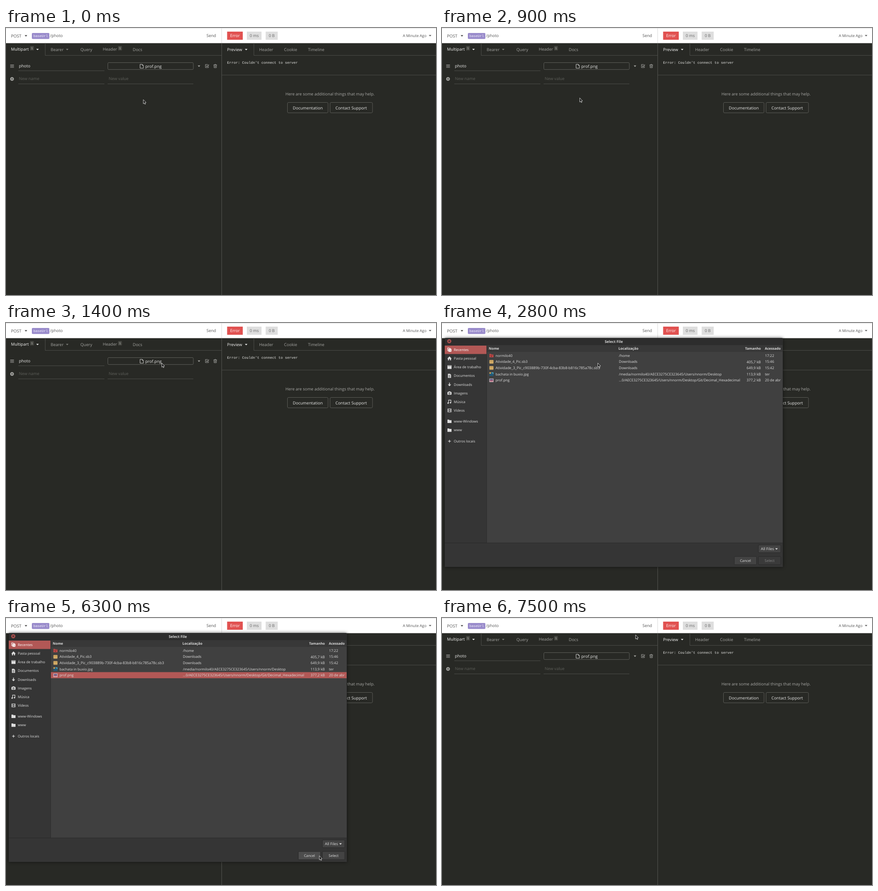
Animation, 948 px wide and 590 px high, one loop 8 s. Source, as an HTML page with a canvas:

```html
<!DOCTYPE html>
<html lang="pt">
<head>
<meta charset="utf-8">
<title>Select File</title>
<style>
html, body { margin: 0; width: 100%; height: 100%; overflow: hidden; background: #282925; }
canvas { display: block; width: 948px; height: 590px; }
</style>
</head>
<body>
<canvas id="stage"></canvas>
<script>
const W = 948, H = 590, LOOP = 8000;
const canvas = document.getElementById('stage');
const dpr = window.devicePixelRatio || 1;
canvas.width = W * dpr;
canvas.height = H * dpr;
const c = canvas.getContext('2d');
c.scale(dpr, dpr);
c.textRendering = 'geometricPrecision';

const SANS = '"Open Sans", "Noto Sans", sans-serif';
const MONO = '"Liberation Mono", monospace';
const BG = '#282925', LINE = '#4b4c48', RED = '#b25856';
const USER = 'normilo40', SHORT_USER = 'nnorm';

// y is the middle of the capitals
function text(s, x, y, color, size = 9.1, opt = {}) {
  c.font = `${opt.weight || 400} ${size}px ${opt.font || SANS}`;
  c.textAlign = opt.align || 'left';
  c.fillStyle = color;
  c.fillText(s, x, y + size * 0.36);
}

function rect(x, y, w, h, color) {
  c.fillStyle = color;
  c.fillRect(x, y, w, h);
}

function box(x, y, w, h, r, fill, stroke) {
  c.beginPath();
  c.roundRect(x, y, w, h, r);
  if (fill) { c.fillStyle = fill; c.fill(); }
  if (stroke) { c.strokeStyle = stroke; c.lineWidth = 1; c.stroke(); }
}

function path(points, x, y, close) {
  c.beginPath();
  points.forEach(([px, py]) => c.lineTo(x + px, y + py));
  if (close) c.closePath();
}

function shape(points, x, y, color) {
  path(points, x, y, true);
  c.fillStyle = color;
  c.fill();
}

function stroke(points, x, y, color, width = 1, close = false) {
  path(points, x, y, close);
  c.strokeStyle = color;
  c.lineWidth = width;
  c.stroke();
}

function disc(x, y, r, color) {
  c.beginPath();
  c.arc(x, y, r, 0, Math.PI * 2);
  c.fillStyle = color;
  c.fill();
}

const caret = (x, y, color, r = 2.8) =>
  shape([[-r, -r / 2], [r, -r / 2], [0, r / 2 + 0.3]], x, y, color);

function badge(x, y) {
  box(x, y, 8.6, 9.4, 1.5, '#454641');
  text('1', x + 4.3, y + 4.7, '#b5b5b2', 7, { align: 'center', font: MONO });
}

function topBar() {
  rect(0, 0, W, 33.5, '#fff');
  rect(0, 0, W, 1, '#dedede');
  text('POST', 11, 17.5, '#555', 9.2);
  caret(44, 17.2, '#444');
  box(57, 11, 38.6, 13.3, 2, '#998bcb');
  text('baseUrl', 60.5, 17.2, '#f4f2fc', 7.55, { font: MONO });
  text('/photo', 97, 17, '#555', 8.95);
  text('Send', 442, 17.2, '#555', 9);
  rect(475, 0, 1, 33.5, '#dcdcdc');
  rect(487.5, 8, 34.5, 18, '#e15251');
  text('Error', 504.8, 17.2, '#fff', 9, { align: 'center' });
  rect(531, 8, 32.3, 18, '#dedede');
  text('0 ms', 547.2, 17.2, '#666', 8.9, { align: 'center' });
  rect(572.5, 8, 26.5, 18, '#dedede');
  text('0 B', 585.7, 17.2, '#666', 8.9, { align: 'center' });
  text('A Minute Ago', 874.8, 16.8, '#555', 8.4);
  caret(935, 16.8, '#555');
}

function tabs() {
  const dim = '#a4a4a1';
  text('Multipart', 11, 47.2, '#f5f5f4');
  badge(53, 40);
  caret(69.5, 47.3, '#f0f0ef');
  text('Bearer', 98.5, 47.5, dim);
  caret(135, 47.5, '#777873');
  text('Query', 164, 47.5, dim);
  text('Header', 213.5, 47.2, dim);
  badge(247, 40);
  text('Docs', 279.5, 47.5, dim);
  rect(86, 33.5, 1, 27, LINE);
  rect(86, 60, 389, 1, LINE);

  text('Preview', 487.5, 47.5, '#f5f5f4', 9.2);
  caret(529.5, 47.6, '#f0f0ef');
  text('Header', 558, 47.5, dim);
  text('Cookie', 613, 47.5, dim);
  text('Timeline', 665.8, 47.5, dim);
  rect(546, 33.5, 1, 27, LINE);
  rect(546, 60, W - 546, 1, LINE);
}

function trash(x, y, color) {
  stroke([[-3.8, -2.5], [3.8, -2.5]], x, y, color, 0.9);
  stroke([[-1.3, -2.6], [-1, -3.8], [1, -3.8], [1.3, -2.6]], x, y, color, 0.8);
  stroke([[-2.8, -2.5], [-2.5, 3.8], [2.5, 3.8], [2.8, -2.5]], x, y, color, 0.9);
  for (const dx of [-1.1, 0, 1.1]) stroke([[dx, -1], [dx, 2.4]], x, y, color, 0.6);
}

function gear(x, y, color) {
  for (let i = 0; i < 8; i++) {
    const a = i * Math.PI / 4, dx = Math.cos(a), dy = Math.sin(a);
    stroke([[dx * 2, dy * 2], [dx * 4.3, dy * 4.3]], x, y, color, 1.8);
  }
  disc(x, y, 3.3, color);
  disc(x, y, 1.4, BG);
}

function form() {
  const icon = '#aaaaa7', hint = '#5d5e59';
  for (const dy of [81, 83.7, 86.4]) rect(9.3, dy, 8.2, 1.1, icon);
  text('photo', 28.5, 83.5, '#e9e9e8', 9.05);
  rect(27, 94, 190, 1, LINE);
  box(224.5, 76.5, 188.5, 15.2, 2, null, '#5e5f5a');
  stroke([[0, 0], [4.8, 0], [7.4, 2.6], [7.4, 8.6], [0, 8.6]], 295.6, 80.2, '#dededc', 0.9, true);
  stroke([[4.8, 0], [4.8, 2.7], [7.4, 2.7]], 295.6, 80.2, '#dededc', 0.8);
  text('prof.png', 307, 84.8, '#e9e9e8');
  caret(425.5, 84.2, icon);
  stroke([[3.1, 0.2], [3.1, 3.6], [-3.5, 3.6], [-3.5, -3.4], [2, -3.4]], 443.2, 84, icon, 0.9);
  stroke([[-1.9, -0.6], [0, 1.4], [4.2, -2.9]], 443.2, 84, icon, 1.3);
  trash(461.3, 84, icon);
  gear(13.3, 112.6, icon);
  text('New name', 28.5, 112.2, hint, 9);
  text('New value', 226.5, 112.2, hint, 9.05);
  rect(27, 123, 190, 1, LINE);
  rect(224, 123, 189, 1, LINE);
}

function response() {
  text("Error: Couldn't connect to server", 487.6, 76.2, '#e4e4e2', 7.87, { font: MONO });
  rect(476, 103.5, W - 476, 1, LINE);
  text('Here are some additional things that may help.', 714.3, 146.2, '#a9a9a6', 9, { align: 'center' });
  box(620.5, 164.5, 89.5, 23, 2.5, null, '#5a5b56');
  box(714.5, 164.5, 93.5, 23, 2.5, null, '#5a5b56');
  text('Documentation', 665.3, 176.3, '#e9e9e8', 9.1, { align: 'center' });
  text('Contact Support', 761, 176.3, '#e9e9e8', 9.15, { align: 'center' });
}

function app() {
  rect(0, 0, W, H, BG);
  topBar();
  tabs();
  rect(475, 33.5, 1, H, '#52534f');
  form();
  response();
}

const INK = '#dedede';
const folder = (x, y, color) =>
  shape([[-4.5, -3.8], [-1, -3.8], [0, -2.6], [4.5, -2.6], [4.5, 3.8], [-4.5, 3.8]], x, y, color);

const icons = {
  recent(x, y) {
    stroke([[-4, 3], [-4, -4], [-1, -4], [0, -3], [3, -3]], x, y, '#fff', 1.1);
    box(x - 2.4, y - 1.9, 6.6, 6.4, 1, '#fff');
    stroke([[0.9, -0.6], [0.9, 1.7], [2.5, 1.7]], x, y, RED, 0.9);
  },
  home(x, y) {
    shape([[-5, 0.4], [0, -4.6], [5, 0.4], [3.5, 0.4], [3.5, 4.2], [1.1, 4.2], [1.1, 1.2],
      [-1.1, 1.2], [-1.1, 4.2], [-3.5, 4.2], [-3.5, 0.4]], x, y, INK);
  },
  desktop(x, y) {
    rect(x - 4.5, y - 4, 9, 8, INK);
    rect(x - 3.6, y - 3, 7.2, 0.8, '#555');
  },
  doc(x, y) {
    shape([[-3.5, -4.5], [1.2, -4.5], [3.5, -2.2], [3.5, 4.5], [-3.5, 4.5]], x, y, INK);
    for (const dy of [-1.6, 0.3, 2.2]) rect(x - 2.2, y + dy, 4.4, 0.8, '#444');
  },
  down(x, y) {
    rect(x - 0.8, y - 4, 1.6, 5, INK);
    shape([[-3.6, 0], [3.6, 0], [0, 4]], x, y, INK);
  },
  camera(x, y) {
    box(x - 4.5, y - 2.8, 9, 6.4, 1, INK);
    rect(x - 2, y - 4, 4, 1.5, INK);
    disc(x, y + 0.4, 2.1, '#383838');
    disc(x, y + 0.4, 1.1, INK);
  },
  note(x, y) {
    stroke([[-2, 2.8], [-2, -3.6], [3.2, -3.6], [3.2, 2]], x, y, INK, 1.2);
    disc(x - 3, y + 2.9, 1.6, INK);
    disc(x + 2.2, y + 2.1, 1.6, INK);
  },
  film(x, y) {
    rect(x - 4.3, y - 4, 8.6, 8, INK);
    rect(x - 2, y - 3, 4, 2.5, '#3a3a3a');
    rect(x - 2, y + 0.5, 4, 2.5, '#3a3a3a');
    for (let i = -3; i < 4; i += 2) {
      rect(x - 3.8, y + i - 0.5, 1, 1, '#3a3a3a');
      rect(x + 2.8, y + i - 0.5, 1, 1, '#3a3a3a');
    }
  },
  folder: (x, y) => folder(x, y, INK),
  plus(x, y) {
    rect(x - 3, y - 0.6, 6, 1.2, INK);
    rect(x - 0.6, y - 3, 1.2, 6, INK);
  },
  user(x, y) {
    folder(x, y, '#bf4a48');
    rect(x - 4.5, y - 1.2, 9, 0.8, '#8d3535');
    disc(x, y + 1.4, 1.2, '#7d2c2c');
  },
  pack(x, y) {
    box(x - 4.5, y - 4, 9, 8, 1.2, '#d2ab66');
    rect(x - 4.5, y - 1.5, 9, 0.7, '#b78f4d');
  },
  photo(x, y) {
    rect(x - 4.5, y - 4, 9, 8, '#225a78');
    rect(x - 4.5, y - 4, 3.5, 3, '#d9a04c');
    shape([[-1, -4], [4.5, -4], [4.5, 0]], x, y, '#4ba0b8');
  },
  image(x, y) {
    rect(x - 4.5, y - 3.8, 9, 7.6, '#e6e0e6');
    rect(x - 3.7, y - 3, 7.4, 3.4, '#6b5a83');
    rect(x - 3.7, y + 0.4, 7.4, 2.4, '#c2697c');
  }
};

const places = [
  ['recent', 'Recentes', 59], ['home', 'Pasta pessoal', 78.3], ['desktop', 'Área de trabalho', 97.5],
  ['doc', 'Documentos', 116.7], ['down', 'Downloads', 135.8], ['camera', 'Imagens', 155],
  ['note', 'Música', 174], ['film', 'Vídeos', 193.2], ['folder', 'www-Windows', 217.3],
  ['folder', 'www', 236.7], ['plus', 'Outros locais', 261.2]
];

const drive = 'AECE3275CE323645/Users/' + SHORT_USER + '/Desktop';
const files = [
  ['user', USER, '/home', '', '17:22'],
  ['pack', 'Atividade_4_Pic.sb3', 'Downloads', '405,7 kB', '15:46'],
  ['pack', 'Atividade_3_Pic_c903889b-730f-4cba-83b8-b816c785a78c.sb3', 'Downloads', '649,9 kB', '15:42'],
  ['photo', 'bachata in buxio.jpg', `/media/${USER}/${drive}`, '113,9 kB', 'ter'],
  ['image', 'prof.png', `…0/${drive}/Git/Decimal_Hexadecimal`, '377,2 kB', '20 de abr']
];

function fileList(selected) {
  const bold = { weight: 700 };
  rect(99, 49, 652, 437, '#404040');
  rect(99, 49, 652, 15, '#383838');
  text('Nome', 103, 56.6, '#dcdcdc', 7.6, bold);
  text('Localização', 389, 56.6, '#dcdcdc', 7.65, bold);
  text('Tamanho', 703, 56.6, '#dcdcdc', 7.5, { weight: 700, align: 'right' });
  text('Acessado', 711.7, 56.6, '#dcdcdc', 7.55, bold);
  for (const x of [385, 665, 707]) rect(x, 50, 1, 13, '#343434');
  if (selected) rect(99, 119.6, 652, 13.5, RED);
  files.forEach(([icon, name, place, size, date], i) => {
    const y = 72 + i * 13.65;
    icons[icon](109, y);
    text(name, 118, y, INK, name.length > 30 ? 8.05 : 7.8);
    text(place, 390, y, INK, 7.85);
    text(size, 703, y, INK, 7.95, { align: 'right' });
    text(date, 712, y, INK, 7.9);
  });
}

function button(label, x, y, w, h, fill, color, size = 7.8) {
  box(x + 0.5, y + 0.5, w - 1, h - 1, 1.5, fill, '#292929');
  text(label, x + w / 2, y + h / 2, color, size, { align: 'center' });
}

function dialog(selected, hover) {
  c.save();
  c.shadowColor = 'rgba(0,0,0,0.6)';
  c.shadowBlur = 7 * dpr;
  box(6, 33, 745.5, 506, [3, 3, 0, 0], '#353535');
  c.restore();
  box(6, 33, 745.5, 16, [3, 3, 0, 0], '#2d2d2d');
  disc(16, 40.3, 4.6, '#a94e4c');
  stroke([[-1.6, -1.6], [1.6, 1.6]], 16, 40.3, '#2d2d2d', 1.1);
  stroke([[1.6, -1.6], [-1.6, 1.6]], 16, 40.3, '#2d2d2d', 1.1);
  text('Select File', 378.7, 41, '#d8d8d8', 8, { weight: 700, align: 'center' });

  rect(6, 50, 92.5, 18.5, RED);
  for (const [icon, label, y] of places) {
    icons[icon](16.5, y);
    text(label, 26, y, icon === 'recent' ? '#fff' : INK, 7.75);
  }
  rect(98, 49, 1, 437, '#2e2e2e');
  fileList(selected);

  rect(6, 485.5, 745.5, 1, '#2b2b2b');
  button('', 697, 490, 50.5, 18, '#434343', INK);
  text('All Files', 703, 499, INK, 8.4);
  caret(737.5, 499.2, INK);
  button('Cancel', 644, 515.5, 50, 19, hover ? '#4d4d4d' : '#434343', '#e2e2e2');
  button('Select', 697, 515.5, 50.5, 19, selected ? '#434343' : '#3a3a3a', selected ? '#e2e2e2' : '#858585', 7.95);
}

function cursor([x, y]) {
  const arrow = [[0.5, 0.5], [0.5, 9.6], [2.5, 7.8], [3.9, 10.8], [5.3, 10.2], [4, 7.2], [6.7, 7]];
  shape(arrow, x, y, '#151515');
  stroke(arrow, x, y, '#f2f2f2', 0.8, true);
}

function pointer(t) {
  if (t < 900) return [302.3, 157.8];
  if (t < 2800) {
    const k = Math.min(5, Math.floor((t - 900) / 100)) / 5;
    const s = k * k * (3 - 2 * k);
    return [303.2 + 39.8 * s, 154 - 66 * s];
  }
  if (t < 5400) return [343, 88];
  if (t < 6300) return [665, 513];
  if (t < 7500) return [690.4, 525];
  return [426.3, 36.8];
}

function draw(t) {
  app();
  if (t >= 2800 && t < 7500) dialog(t >= 5400, t >= 6300);
  cursor(pointer(t));
}

const start = performance.now();
function tick() {
  draw((performance.now() - start) % LOOP);
  requestAnimationFrame(tick);
}
tick();
</script>
</body>
</html>
```
